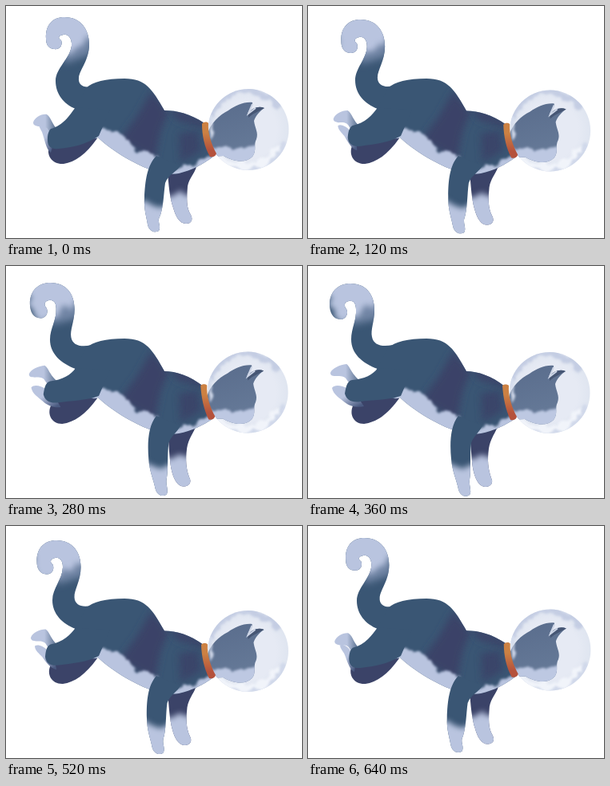
Animation, 370 px wide and 291 px high, one loop 680 ms. Source, as an HTML page:

```html
<!DOCTYPE html>
<html lang="en">
<head>
<meta charset="utf-8">
<title>Floating space cat</title>
<style>
  html, body { margin: 0; width: 100%; height: 100%; overflow: hidden; background: #fff; }
  svg { display: block; width: 100vw; height: 100vh; }
  .blue { fill: #3a5674; }
  .navy { fill: #3b4368; }
  .pale { fill: #b9c4df; }
  .soft { filter: url(#soft); }
  .rough { filter: url(#rough); }
  .fade { filter: url(#fade); }
</style>
</head>
<body>
<svg viewBox="0 0 370 291">
  <defs>
    <filter id="soft" x="-50%" y="-50%" width="200%" height="200%">
      <feGaussianBlur stdDeviation="5"/>
    </filter>
    <filter id="rough" x="-30%" y="-30%" width="160%" height="160%" color-interpolation-filters="sRGB">
      <feTurbulence type="fractalNoise" baseFrequency=".07" numOctaves="3" seed="4"/>
      <feDisplacementMap in="SourceGraphic" scale="16" xChannelSelector="R" yChannelSelector="G"/>
      <feGaussianBlur stdDeviation="1.5"/>
    </filter>
    <filter id="fade" x="-30%" y="-30%" width="160%" height="160%" color-interpolation-filters="sRGB">
      <feTurbulence type="fractalNoise" baseFrequency=".09" numOctaves="3" seed="4"/>
      <feDisplacementMap in="SourceGraphic" scale="16" xChannelSelector="R" yChannelSelector="G"/>
      <feGaussianBlur stdDeviation="3.5"/>
    </filter>
    <linearGradient id="paw">
      <stop offset=".5" stop-color="#b9c4df"/>
      <stop offset="1" stop-color="#4d6584"/>
    </linearGradient>
    <linearGradient id="shin" x2=".8" y2="1">
      <stop offset=".5" stop-color="#b9c4df"/>
      <stop offset="1" stop-color="#4a5a80"/>
    </linearGradient>
    <linearGradient id="strap" x2="0" y2="1">
      <stop offset=".3" stop-color="#cc8143"/>
      <stop offset=".8" stop-color="#b5523c"/>
    </linearGradient>
    <linearGradient id="fur" x2=".3" y2="1">
      <stop offset="0" stop-color="#596c8c"/>
      <stop offset="1" stop-color="#667a98"/>
    </linearGradient>
    <radialGradient id="glass">
      <stop offset=".7" stop-color="#e6eaf4"/>
      <stop offset="1" stop-color="#dfe5f0"/>
    </radialGradient>
    <clipPath id="inTail"><use href="#tail"/></clipPath>
    <clipPath id="inBody"><use href="#body"/></clipPath>
    <clipPath id="inNear"><use href="#near"/></clipPath>
    <clipPath id="inFar"><use href="#far"/></clipPath>
    <clipPath id="inGlass"><use href="#dome"/></clipPath>
    <clipPath id="inHead"><use href="#head"/></clipPath>
  </defs>

  <!-- far front leg -->
  <path id="far" class="navy"
    d="M202 205 C203 225 205 242 209 253 C212 264 217 273 225 273 C232 273 234 268 231 262 C225 252 226 242 227 226 C229 216 235 211 238 202 Z"
    data-to="M202 205 C204 225 204 245 207 258 C210 270 215 277 222 277 C229 277 232 271 229 266 C225 254 224 244 226 229 C228 217 233 211 236 204 Z"/>
  <g clip-path="url(#inFar)">
    <path class="pale fade" d="M190 239 L245 232 V290 H190 Z" data-to="M190 243 L245 235 V292 H190 Z"/>
  </g>

  <!-- far hind leg -->
  <path class="navy" d="M54 176 C50 188 58 199 72 198 C86 196 100 186 114 166 L90 150 Z"
    data-to="M58 172 C50 184 56 198 70 198 C85 196 99 187 114 166 L90 150 Z"/>
  <path fill="url(#shin)"
    d="M42 148 C46 148 52 152 54 158 C58 168 60 174 56 184 C50 180 48 166 45 158 C43 154 40 150 42 148 Z"
    data-to="M30 153 C34 148 42 150 50 154 C58 160 64 166 70 176 C62 178 52 176 46 171 C40 166 32 162 30 153 Z"/>

  <!-- tail -->
  <path id="tail" class="blue"
    d="M60 54 C52 53 50 47 50 41 C49 24 58 14 73 14 C94 14 104 30 104 48 C104 68 92 80 91 90 C90 99 97 103 106 101 L100 128 L87 129 C72 123 62 110 62 94 C62 78 80 66 82 50 C83 40 77 35 72 36 C66 37 64 40 69 43 C71 50 67 55 60 54 Z"
    data-to="M41 67 C31 67 27 58 27 48 C27 32 38 22 53 22 C73 22 83 36 83 55 C83 70 78 80 80 89 C82 99 92 102 106 99 L100 128 L87 129 C68 122 54 110 54 92 C54 78 61 68 60 54 C60 46 56 43 51 44 C46 45 44 49 48 54 C51 60 47 67 41 67 Z"/>
  <g clip-path="url(#inTail)">
    <path fill="#7286a6" class="soft" d="M60 40 L110 36 L106 60 L74 72 Z" data-to="M50 46 L90 42 L88 66 L54 74 Z"/>
    <path class="pale fade" d="M40 5 L112 5 L112 36 L92 47 L80 60 L40 64 Z"
      data-to="M15 12 L92 12 L92 42 L78 51 L56 64 L40 76 L15 76 Z"/>
  </g>

  <!-- body -->
  <path id="body" class="blue"
    d="M100 103 C108 95 125 91 148 91 C175 91 183 105 198 131 C214 131 230 135 248 147 L260 188 C246 199 232 206 216 210 C200 213 180 207 158 195 C143 187 128 177 115 165 C100 172 80 150 87 127 Z"
    data-to="M100 103 C108 95 125 91 148 91 C175 91 183 105 198 132 C212 132 230 138 246 151 L260 191 C246 200 232 207 216 210 C200 213 180 207 158 195 C143 187 128 177 115 165 C100 172 80 150 87 127 Z"/>
  <g clip-path="url(#inBody)">
    <path class="navy soft" d="M182 106 L203 133 L193 158 L186 194 L142 168 L164 138 Z"/>
    <path class="navy soft" d="M203 126 L250 143 L248 153 L214 143 Z"/>
    <path class="navy soft" d="M216 160 L240 156 L244 182 L218 196 Z" opacity=".85"/>
    <path class="pale rough" d="M108 151 L138 158 L150 168 L168 181 L188 189 L190 220 L140 206 L105 174 Z"/>
    <path class="pale rough" d="M212 205 L230 199 L263 186 L264 200 L222 218 L198 220 Z"/>
  </g>

  <!-- near hind leg -->
  <path fill="url(#paw)"
    d="M34 146 C36 140 44 135 51 136 C57 140 58 150 64 154 C60 160 54 160 53 156 C50 150 44 151 40 151 C36 150 34 149 34 146 Z"
    data-to="M28 134 C30 128 40 124 48 123 C53 126 53 134 66 145 C58 151 52 149 48 142 C46 138 40 138 36 138 C31 138 28 138 28 134 Z"/>
  <path class="blue"
    d="M87 127 C80 136 72 150 56 154 C52 158 52 164 52 168 C52 176 56 180 66 179 C84 177 100 174 116 163 L130 130 Z"
    data-to="M87 128 C82 136 70 142 55 143 C48 144 47 155 46 160 C48 168 55 172 66 170 C80 168 100 168 116 163 L130 130 Z"/>

  <!-- near front leg -->
  <path id="near" class="blue"
    d="M188 188 C176 200 174 220 173 240 C172 255 176 266 177 274 C179 283 186 285 191 282 C194 277 190 272 191 267 C197 255 197 235 199 222 C203 211 214 208 218 200 Z"
    data-to="M188 188 C178 200 177 222 179 242 C180 257 186 269 188 280 C190 288 197 291 202 287 C205 282 201 276 202 268 C204 255 202 238 204 222 C207 213 215 208 218 200 Z"/>
  <g clip-path="url(#inNear)">
    <path class="pale fade" d="M160 247 L210 250 V295 H160 Z" data-to="M165 249 L215 251 V300 H165 Z"/>
  </g>

  <!-- helmet and head -->
  <g id="helmet">
    <ellipse id="dome" cx="303" cy="155" rx="50.5" ry="51" fill="url(#glass)"/>
    <g clip-path="url(#inGlass)">
      <path d="M255 140 C264 110 288 103 304 105 C320 106 334 114 342 126"
        fill="none" stroke="#c4cde3" stroke-width="9" class="rough"/>
      <path d="M254 175 C268 201 292 209 314 203 C330 198 342 188 348 174"
        fill="none" stroke="#d0d8ea" stroke-width="6" class="rough"/>
      <path class="rough" d="M258 180 L280 193 L306 198 L318 190 L330 188 L338 176 L345 178 L326 200 L296 206 L266 196 Z" fill="#f1f4fa"/>
      <path id="head" fill="url(#fur)" d="M252 160 C256 147 266 137 278 131 C287 125 297 120 308 121 C309 124 305 128 302 135 C308 127 316 125 323 128 C317 132 312 138 310 144 C311 153 316 159 313 167 C309 174 314 181 308 189 C299 198 284 195 272 188 L253 189 Z"/>
      <g clip-path="url(#inHead)">
        <path class="rough" d="M245 180 L270 174 L286 179 L300 180 L318 171 V205 H245 Z" fill="#bdc8e2"/>
      </g>
      <path d="M323 128 C317 125 309 127 303 135 L303 140 L308 136 Z" fill="#465674"/>
      <path d="M308 123 L303 135 L312 128" fill="none" stroke="#cdd5e6" stroke-width="2"/>
      <path class="rough" d="M251 139 L259 136 L257 151 L263 161 L254 168 Z" fill="#d4dced"/>
    </g>
  </g>
  <path fill="url(#strap)"
    d="M245 148 C247 145 251 145 253 147 C252 160 257 174 263 185 C262 189 258 190 255 189 C248 177 245 162 245 148 Z"
    data-to="M243 150 C245 148 249 148 251 150 C250 163 255 178 261 189 C260 193 256 194 253 193 C247 180 244 165 243 150 Z"/>
</svg>
<script>
  const STEP = 40, STEPS = 17;
  const number = /-?\d*\.?\d+/g;
  const helmet = document.getElementById('helmet');
  const parts = [...document.querySelectorAll('[data-to]')].map(el => ({
    el,
    from: el.getAttribute('d'),
    to: el.dataset.to.match(number).map(Number)
  }));
  let last = -1;

  function pose(p) {
    for (const { el, from, to } of parts) {
      let i = 0;
      el.setAttribute('d', from.replace(number, n => +n + (to[i++] - n) * p));
    }
    helmet.setAttribute('transform', `translate(${-p} ${4 * p})`);
  }

  function tick() {
    const n = Math.floor(performance.now() / STEP) % STEPS;
    if (n !== last) {
      pose(Math.min(n, STEPS - n) / 8);
      last = n;
    }
    requestAnimationFrame(tick);
  }
  tick();
</script>
</body>
</html>
```
